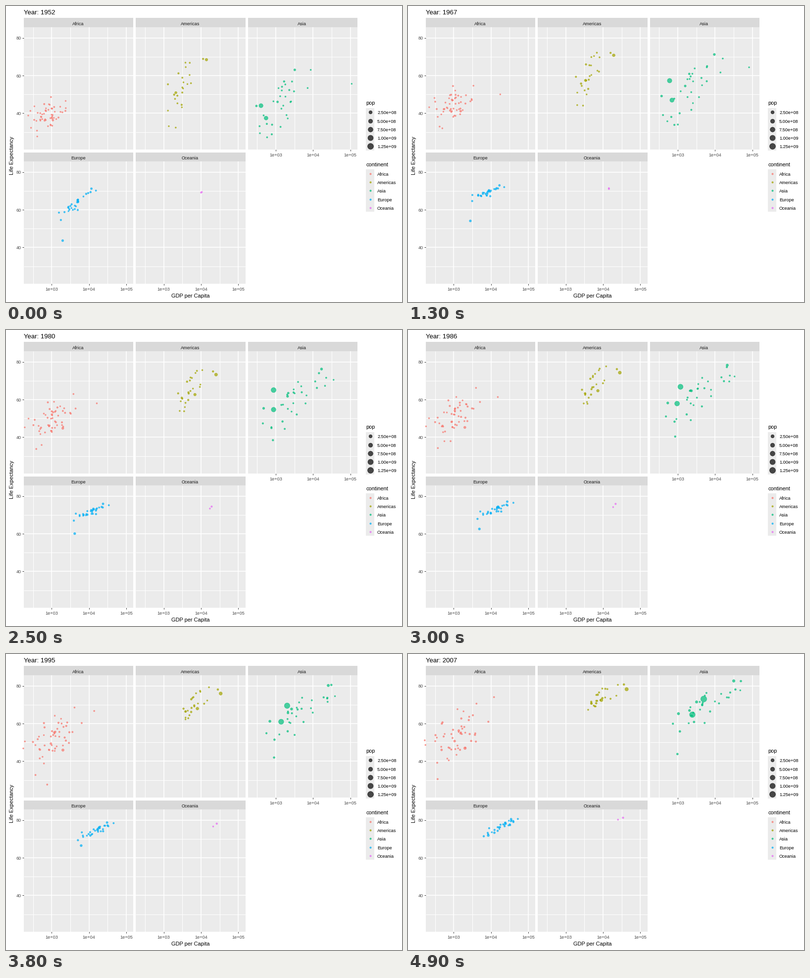
These frames come from a looping animation (800x600 px, 5000 ms). A matplotlib script:

```python
import matplotlib.pyplot as plt
import numpy as np
from matplotlib.animation import FuncAnimation
from matplotlib.patches import Rectangle

WIDTH, HEIGHT, FRAMES, INTERVAL = 800, 600, 50, 100
FIRST_YEAR, LAST_YEAR = 1952, 2007
PT = 0.72  # points per pixel at 100 dpi
ALPHA, STROKE = 0.7, 0.7
MAX_POP = 1319  # millions
MAX_LIFE = 83
PANEL_W, PANEL_H = 221.3, 248
ROW_1, ROW_2 = 43, 315
COL_1, COL_2, COL_3 = 36, 262.4, 488.8
SMALL, MEDIUM, LARGE = 9.2, 11, 13.2

plt.rcParams["font.family"] = "Liberation Sans"

# Cloud stops: year, mean log10 income, its spread, mean life, its spread, correlation.
# Landmarks: final population, then stops of (year, income, life).
PANELS = [
    dict(name="Africa", color="#F8766D", left=COL_1, top=ROW_1,
         count=49, median_pop=9, growth=3.8,
         cloud=[(1952, 2.98, 0.29, 39.2, 5.0, 0.35), (1967, 3.10, 0.33, 45.2, 5.8, 0.4),
                (1987, 3.16, 0.38, 53.4, 7.5, 0.6), (2007, 3.22, 0.43, 55.0, 9.3, 0.45)],
         landmarks=[
             (135, [(1952, 1077, 36.3), (1977, 1982, 44.5), (2007, 2014, 46.9)]),
             (9, [(1952, 493, 40), (1982, 882, 46.2), (1992, 737, 23.6), (2007, 863, 46.2)]),
             (6, [(1952, 2388, 42.7), (1967, 18773, 50.2), (2007, 12057, 74)])]),
    dict(name="Americas", color="#A3A500", left=COL_2, top=ROW_1,
         count=22, median_pop=9, growth=2.5,
         cloud=[(1952, 3.49, 0.18, 52.8, 9.0, 0.55), (1967, 3.64, 0.19, 60.0, 7.5, 0.6),
                (1987, 3.75, 0.20, 68.0, 5.5, 0.65), (2007, 3.93, 0.25, 73.5, 3.6, 0.6)],
         landmarks=[
             (301, [(1952, 13990, 68.4), (1967, 19530, 70.8), (2007, 42952, 78.2)]),
             (190, [(1952, 2109, 50.9), (1967, 3430, 57.6), (1980, 6860, 62.6),
                    (2007, 9066, 72.4)]),
             (33, [(1952, 11367, 68.8), (1967, 16077, 72.1), (2007, 36319, 80.7)])]),
    dict(name="Asia", color="#00BF7D", left=COL_3, top=ROW_1,
         count=28, median_pop=18, growth=2.7,
         cloud=[(1952, 3.18, 0.36, 46.3, 8.6, 0.5), (1967, 3.40, 0.42, 54.5, 8.8, 0.6),
                (1987, 3.65, 0.48, 65.0, 7.0, 0.7), (2007, 3.80, 0.48, 71.0, 6.2, 0.75)],
         landmarks=[
             (1319, [(1952, 400, 44), (1957, 576, 50.5), (1962, 488, 44.5), (1967, 613, 58.4),
                     (1980, 868, 65), (1992, 1656, 68.7), (2007, 4959, 73)]),
             (1110, [(1952, 547, 37.4), (1967, 701, 47.2), (1987, 977, 58.6),
                     (2007, 2452, 64.7)]),
             (127, [(1952, 3217, 63), (1967, 9848, 71.4), (1987, 22376, 78.7),
                    (2007, 31656, 82.6)]),
             (2.5, [(1952, 108382, 55.6), (1967, 80895, 64.6), (1982, 31354, 71.3),
                    (2007, 47307, 77.6)]),
             (32, [(1952, 779, 28.8), (1987, 852, 40.8), (2007, 975, 43.8)])]),
    dict(name="Europe", color="#00B0F6", left=COL_1, top=ROW_2,
         count=29, median_pop=10, growth=1.3,
         cloud=[(1952, 3.72, 0.25, 65.2, 4.6, 0.85), (1967, 3.96, 0.21, 70.2, 2.2, 0.75),
                (1987, 4.20, 0.23, 74.2, 2.5, 0.8), (2007, 4.36, 0.23, 78.0, 2.8, 0.88)],
         landmarks=[
             (71, [(1952, 1969, 43.6), (1957, 2219, 48.1), (1967, 2826, 54.3),
                   (1987, 5089, 63.1), (2007, 8458, 71.8)])]),
    dict(name="Oceania", color="#E76BF3", left=COL_2, top=ROW_2,
         count=0, median_pop=1, growth=2.2, cloud=[],
         landmarks=[
             (20, [(1952, 10040, 69.1), (1967, 14526, 71.1), (2007, 34435, 81.2)]),
             (4, [(1952, 10557, 69.4), (1967, 14464, 71.5), (1987, 19007, 74.3),
                  (2007, 25185, 80.2)])]),
]

fig = plt.figure(figsize=(WIDTH / 100, HEIGHT / 100), dpi=100, facecolor="white")
ax = fig.add_axes([0, 0, 1, 1])
ax.set_xlim(0, WIDTH)
ax.set_ylim(HEIGHT, 0)
ax.axis("off")


def x_of(left, log_income):
    return left + 56.3 + (log_income - 3) * 75.3


def y_of(top, life):
    return top + 174.3 - (life - 40) * 3.82


def label(x, y, text, size=SMALL, color="black", ha="left", **kw):
    return ax.text(x, y, text, fontsize=size * PT, color=color, ha=ha, va="baseline", **kw)


def box(x, y, w, h, color):
    ax.add_patch(Rectangle((x, y), w, h, facecolor=color, linewidth=0, zorder=0))


def line(xs, ys, color="white", width=1):
    ax.plot(xs, ys, color=color, linewidth=width * PT, solid_capstyle="butt", zorder=1)


def pop_size(pop):
    return 1 + 5 * np.sqrt(np.asarray(pop) / MAX_POP)


def dot_area(size):
    radius = 0.375 * (size * 2.845 + 0.945)
    diameter = 1.85 * radius + 0.4
    return ((diameter - STROKE) * PT) ** 2


def dots(x, y, area, color):
    return ax.scatter(x, y, s=area, c=color, alpha=ALPHA, linewidths=STROKE * PT,
                      edgecolors=color, zorder=3)


def draw_panel(name, left, top):
    right, bottom = left + PANEL_W, top + PANEL_H
    strip = 19 if top == ROW_1 else 18
    box(left, top - strip, PANEL_W, strip, "#D9D9D9")
    box(left, top, PANEL_W, PANEL_H, "#EBEBEB")
    label(left + PANEL_W / 2 - 1, top - 4, name, color="#1A1A1A", ha="center")
    for life in (30, 50, 70):
        line([left, right], [y_of(top, life)] * 2)
    for power in (2.5, 3.5, 4.5):
        line([x_of(left, power)] * 2, [top, bottom])
    for life in (40, 60, 80):
        y = y_of(top, life)
        line([left, right], [y, y], width=1.6)
        if left == COL_1:
            line([left - 3, left], [y, y], "#333333")
            label(31, y + 4, str(life), color="#4D4D4D", ha="right")
    for power in (3, 4, 5):
        x = x_of(left, power)
        line([x, x], [top, bottom], width=1.6)
        if top == ROW_2 or left == COL_3:
            line([x, x], [bottom, bottom + 3], "#333333")
            label(x, bottom + 14, f"1e+0{power}", color="#4D4D4D", ha="center")


def draw_legends():
    label(727, 200, "pop", MEDIUM)
    box(727, 206.5, 17.3, 86.4, "#EBEBEB")
    for i in range(5):
        y = 215.3 + 17.28 * i
        pop = 250 * (i + 1)
        dots([735.6], [y], dot_area(pop_size(pop)), "black")
        label(750, y + 4, f"{pop * 1e6:.2e}")
    label(727, 325, "continent", MEDIUM)
    box(727, 331, 17.3, 86.4, "#EBEBEB")
    for i, panel in enumerate(PANELS):
        y = 339.7 + 17.28 * i
        dots([735.6], [y], dot_area(1.5), panel["color"])
        label(750, y + 4, panel["name"])


def between(stops, year):
    """Linear blend of the rows of stops, whose first column is the year."""
    years, *columns = np.array(stops).T
    return [np.interp(year, years, column) for column in columns]


class Continent:
    def __init__(self, panel, rng):
        self.panel = panel
        count = panel["count"]
        # Rank in wealth and health, each with a second value to drift towards.
        self.traits = np.clip(rng.normal(size=(4, count)), -2.1, 2.1)
        cloud_pop = panel["median_pop"] * np.exp(rng.normal(0, 0.9, count))
        self.pop = np.append(np.minimum(cloud_pop, 100), [m[0] for m in panel["landmarks"]])
        n = len(self.pop)
        self.dots = dots(np.zeros(n), np.zeros(n), np.ones(n), panel["color"])

    def cloud(self, year, progress):
        if not self.panel["count"]:
            return np.empty(0), np.empty(0)
        mean_income, income_spread, mean_life, life_spread, corr = between(
            self.panel["cloud"], year)
        turn = 0.8 * progress
        wealth, health = self.traits[:2] * np.cos(turn) + self.traits[2:] * np.sin(turn)
        mixed = corr * wealth + np.sqrt(1 - corr ** 2) * health
        life = mean_life + life_spread * mixed
        life = MAX_LIFE - 2 * np.logaddexp(0, (MAX_LIFE - life) / 2)
        return mean_income + income_spread * wealth, life

    def update(self, year, progress):
        income, life = self.cloud(year, progress)
        for _, stops in self.panel["landmarks"]:
            logs = [(y, np.log10(money), age) for y, money, age in stops]
            money, age = between(logs, year)
            income, life = np.append(income, money), np.append(life, age)
        x, y = x_of(self.panel["left"], income), y_of(self.panel["top"], life)
        self.dots.set_offsets(np.column_stack([x, y]))
        pop = self.pop * self.panel["growth"] ** (progress - 1)
        self.dots.set_sizes(dot_area(pop_size(pop)))


rng = np.random.default_rng(7)
continents = []
for panel in PANELS:
    draw_panel(panel["name"], panel["left"], panel["top"])
    continents.append(Continent(panel, rng))

draw_legends()
label(372.5, 591, "GDP per Capita", MEDIUM, ha="center")
label(15, 303.5, "Life Expectancy", MEDIUM, ha="center", rotation=90,
      rotation_mode="anchor")
title = label(36, 17, "", LARGE)


def update(frame):
    progress = frame / (FRAMES - 1)
    year = FIRST_YEAR + (LAST_YEAR - FIRST_YEAR) * progress
    title.set_text(f"Year: {year:.0f}")
    for continent in continents:
        continent.update(year, progress)
    return [title] + [continent.dots for continent in continents]


anim = FuncAnimation(fig, update, frames=FRAMES, interval=INTERVAL, repeat=True,
                     repeat_delay=0, blit=False)
plt.show()
```
